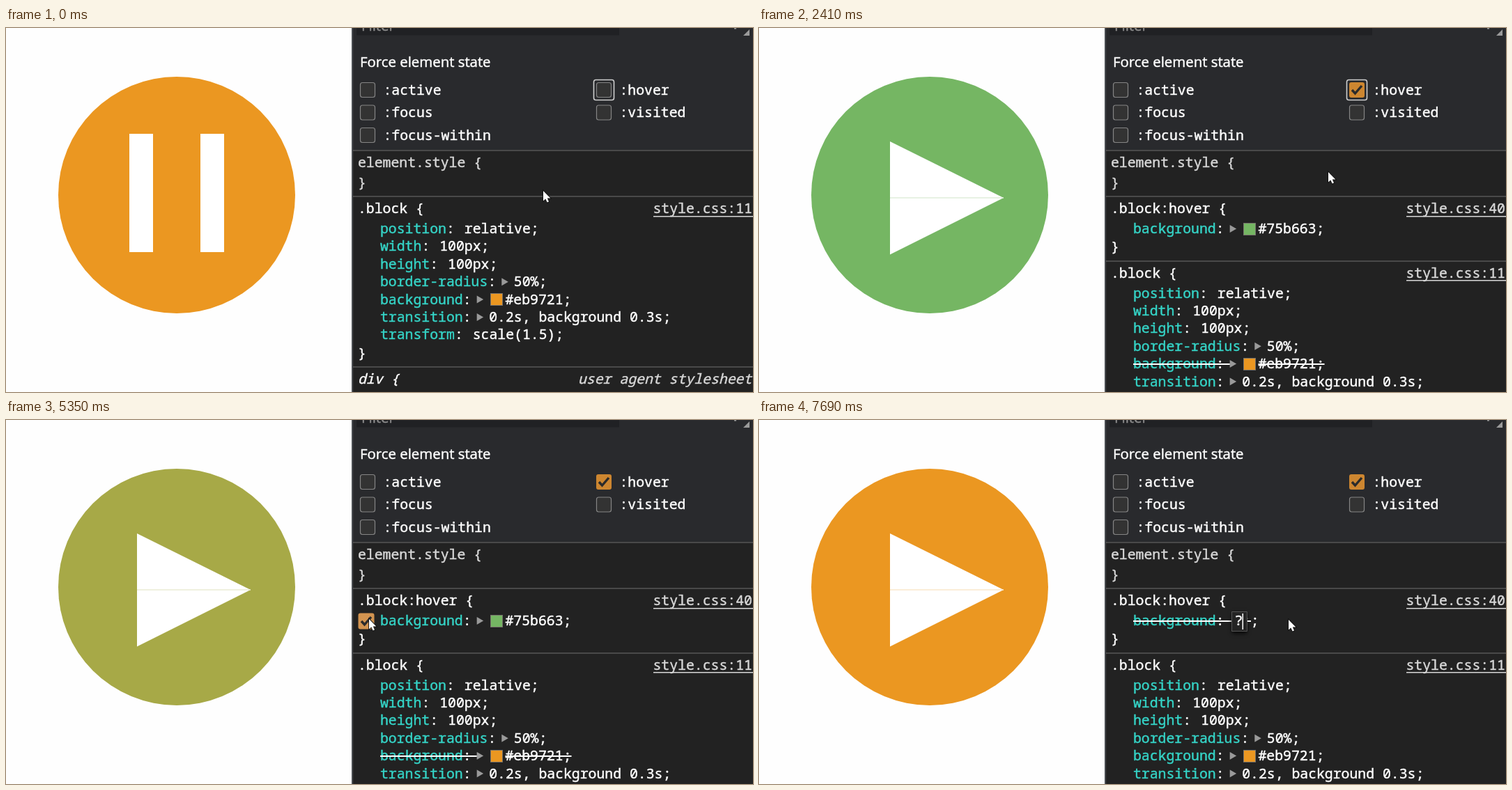
An HTML page with a canvas that plays this animation: 1072x523 px, repeating every 8000 ms.

```html
<!DOCTYPE html>
<html lang="en">
<head>
<meta charset="utf-8">
<title>Forced hover state</title>
<style>
html, body { margin: 0; width: 100%; height: 100%; overflow: hidden; background: #fff; }
canvas { display: block; }
</style>
</head>
<body>
<canvas id="stage" width="1072" height="523"></canvas>
<script>
const ctx = document.getElementById('stage').getContext('2d');
const LOOP = 8000, CHAR = 11.88;
const MONO = '19.8px "Noto Sans Mono", monospace';
const SANS = '20.4px "Open Sans", sans-serif';
const ORANGE = [235, 151, 33], GREEN = [117, 182, 99];
const WHITE = '#fff', GREY = '#d8d8d8', CYAN = '#35d4c7', PANE = '#222222';

const lerp = (a, b, p) => a + (b - a) * p;
const rgb = c => `rgb(${c.map(Math.round)})`;

// CSS "ease": cubic-bezier(.25, .1, .25, 1)
function ease(x) {
  if (x <= 0) return 0;
  if (x >= 1) return 1;
  let lo = 0, hi = 1, u;
  for (let i = 0; i < 20; i++) {
    u = (lo + hi) / 2;
    if (.75 * u * (1 - u) + u ** 3 < x) lo = u; else hi = u;
  }
  return .3 * u * (1 - u) ** 2 + 3 * u * u * (1 - u) + u ** 3;
}

// Background toggles: transition start, repaint times, amount of green reached
const toggles = [
  [1343, [1390, 1460, 1540, 1610], 1],
  [4482, [4500, 4570, 4650, 4820], 0],
  [5250, [5290, 5350, 5440], 1],
  [5906, [5930, 6000, 6080, 6310], 0]
];

function transition([start, repaints], t, duration) {
  if (t < repaints[0]) return 0;
  if (t >= repaints[repaints.length - 1]) return 1;
  const shown = repaints.filter(r => r <= t).pop();
  return ease((shown - start) / duration);
}

function greenAt(t) {
  let green = 0;
  for (const tg of toggles) green = lerp(green, tg[2], transition(tg, t, 300));
  return green;
}

// Pointer moves: from, to, steps, x, y
const moves = [
  [240, 990, 11, 862, 89],
  [2170, 2940, 11, 712, 483],
  [3010, 3800, 11, 592, 331],
  [3890, 4200, 5, 521, 286],
  [6310, 6770, 7, 760, 287]
];

function pointerAt(t) {
  let x = 771, y = 234;
  for (const [from, to, steps, tx, ty] of moves) {
    if (t < from) break;
    const step = Math.min(steps, 1 + Math.floor((t - from) / (to - from) * (steps - 1)));
    const p = step / steps, s = p * p * (3 - 2 * p);
    x = lerp(x, tx, s);
    y = lerp(y, ty, s);
  }
  return [x, y];
}

function rect(x, y, w, h, color) {
  ctx.fillStyle = color;
  ctx.fillRect(x, y, w, h);
}

// A hairline stroke gives the slightly heavier text of a hinted screen font
function text(str, x, y, color = WHITE, font = MONO) {
  const baseline = Math.round(y + 6.5);
  ctx.font = font;
  ctx.fillStyle = ctx.strokeStyle = color;
  ctx.lineWidth = .45;
  ctx.fillText(str, x, baseline);
  ctx.strokeText(str, x, baseline);
}

function polygon(points, color) {
  ctx.beginPath();
  points.forEach(p => ctx.lineTo(...p));
  ctx.closePath();
  ctx.fillStyle = color;
  ctx.fill();
}

function rounded(x, y, w, h, r, fill, stroke, line = 1) {
  ctx.beginPath();
  ctx.roundRect(x, y, w, h, r);
  if (fill) { ctx.fillStyle = fill; ctx.fill(); }
  if (stroke) { ctx.strokeStyle = stroke; ctx.lineWidth = line; ctx.stroke(); }
}

function checkbox(cx, cy, checked, hot, size = 21) {
  const x = cx - size / 2, y = cy - size / 2;
  if (!checked) return rounded(x, y, size, size, 3, hot ? '#3b3b3b' : '#333333', '#858585', 1.2);
  rounded(x - .5, y - .5, size + 1, size + 1, 3, hot ? '#d39450' : '#cd8630');
  ctx.beginPath();
  ctx.moveTo(cx - 7, cy);
  ctx.lineTo(cx - 2.5, cy + 5);
  ctx.lineTo(cx + 7, cy - 6);
  ctx.strokeStyle = '#2b2b2b';
  ctx.lineWidth = 3.4;
  ctx.stroke();
}

function button(t) {
  const green = greenAt(t), turn = transition(toggles[0], t, 200);
  const color = ORANGE.map((c, i) => lerp(c, GREEN[i], green));
  ctx.save();
  ctx.translate(245, 240);
  ctx.beginPath();
  ctx.arc(0, 0, 170, 0, 7);
  ctx.fillStyle = rgb(color);
  ctx.fill();
  ctx.rotate(turn * Math.PI / 2);
  // Each bar folds into one half of the play triangle; the left corner slides out last
  const join = Math.min(1, turn * 1.2), tip = Math.sqrt(turn);
  const top = lerp(-88, -106, turn), bottom = lerp(82, 57, turn);
  for (const [side, corner, spread] of [[-1, -77, turn ** 12], [1, 85.5, turn]]) {
    const inner = lerp(34 * side, 4, join);
    polygon([
      [lerp(68 * side, 4, tip), top], [inner - side * .5 * join, top],
      [inner - side * .5 * join, bottom], [lerp(68 * side, corner, spread), bottom]
    ], WHITE);
  }
  if (turn === 1) rect(3.5, -105, 1, 162, rgb(color.map(c => lerp(255, c, .35))));
  ctx.restore();
}

function divider(y) { rect(498, Math.round(y - 1), 574, 2, '#494949'); }

function link(line, y) {
  text('style.css:' + line, 928.5, y, GREY);
  rect(929, Math.round(y + 10), 143, 1.5, GREY);
}

function strike(from, to, y) { rect(from, Math.round(y - .5), to - from, 2, WHITE); }

function declaration(y, name, value, { arrow, swatch, struck } = {}) {
  text(name, 537, y, CYAN);
  text(':', 537 + name.length * CHAR, y);
  let x = 537 + (name.length + 1) * CHAR;
  const nameEnd = x;
  if (arrow) {
    polygon([[x + 8, y - 5.5], [x + 17.5, y], [x + 8, y + 5.5]], '#9a9a9a');
    x += 25.5;
  } else x += CHAR + 2;
  if (swatch) {
    const sx = Math.round(x + 2), sy = Math.round(y - 9);
    rect(sx, sy, 18, 18, '#77736c');
    rect(sx + 1, sy + 1, 16, 16, swatch);
    x = sx + 21.5;
  }
  text(value, x, y);
  if (struck) {
    strike(537, nameEnd + (arrow ? 8 : 13), y);
    strike(x, x + value.length * CHAR, y);
  }
}

function blockRule(shift, struck, checks) {
  divider(242 + shift);
  text('.block {', 505, 259.5 + shift);
  link(11, 259.5 + shift);
  const rows = [
    ['position', 'relative;'],
    ['width', '100px;'],
    ['height', '100px;'],
    ['border-radius', '50%;', { arrow: true }],
    ['background', '#eb9721;', { arrow: true, swatch: rgb(ORANGE), struck }],
    ['transition', '0.2s, background 0.3s;', { arrow: true }],
    ['transform', 'scale(1.5);']
  ];
  rows.forEach((row, i) => {
    const y = 288.5 + shift + i * 25.4;
    if (checks) checkbox(517, y + .5, true, false, 22);
    declaration(y, ...row);
  });
  text('}', 505, 467 + shift);
  divider(487 + shift);
  text('div {', 505, 504.5 + shift, WHITE, 'italic ' + MONO);
  text('user agent stylesheet', 821, 504.5 + shift, GREY, 'italic ' + MONO);
}

function valueEditor(t) {
  const typed = t >= 7690, value = typed ? '?' : '#75b663';
  const width = value.length * CHAR, y = 288.5;
  text('background', 537, y, CYAN);
  text(':', 537 + 10 * CHAR, y);
  text(';', 693.5 + width - CHAR, y);
  strike(537, 694 + width, y);
  ctx.save();
  ctx.shadowColor = '#000';
  ctx.shadowBlur = 6;
  ctx.shadowOffsetY = 2;
  rounded(678.5, 275.5, width + 10, 28, 0, '#242424');
  ctx.restore();
  rounded(678.5, 275.5, width + 10, 28, 0, null, '#555555');
  text(';', 693.5 + width, y);
  strike(689 + width, 694 + width, y);
  if (!typed) rect(683, 277, width, 25, '#3a5a86');
  text(value, 682.5, y);
  if (typed) rect(693.5, 278, 1.5, 23, WHITE);
}

function hoverRule(t, enabled, showCheck) {
  divider(242);
  text('.block:hover {', 505, 259.5);
  link(40, 259.5);
  if (t >= 6850) valueEditor(t);
  else {
    if (showCheck) checkbox(517, 289, enabled, t >= 4200 && t < 6400, 22);
    declaration(288.5, 'background', '#75b663;', { arrow: enabled, swatch: rgb(GREEN), struck: !enabled });
  }
  text('}', 505, 314.5);
}

function stateOptions(t) {
  rect(498, 0, 574, 175, '#292a2d');
  rect(503, 0, 377, 10.5, '#202124');
  text('Filter', 510, -3, '#8a8a8a', SANS);
  polygon([[1067, 2], [1067, 11], [1058, 11]], '#9a9a9a');
  rect(1045, 0, 3, 1.5, '#9a9a9a');
  text('Force element state', 508, 49, WHITE, SANS);
  const states = [
    [519, 89, ':active'], [519, 121.5, ':focus'], [519, 154, ':focus-within'],
    [858, 89, ':hover'], [858, 121.5, ':visited']
  ];
  for (const [x, y, label] of states) {
    const isHover = label === ':hover';
    checkbox(x, y, isHover && t >= 1230, isHover && t >= 920 && t < 2250);
    text(label, x + 22.5, y);
  }
  if (t < 4420) rounded(843.5, 74.5, 29, 29, 3, null, '#cfcfcf', 1.6);
}

function arrowPointer(x, y) {
  ctx.save();
  ctx.translate(Math.round(x), Math.round(y));
  const shape = new Path2D('M0 0V14.5L3.3 11.4L5.6 16.6L8 15.5L5.8 10.6H10.3Z');
  ctx.strokeStyle = '#111';
  ctx.lineWidth = 1.8;
  ctx.stroke(shape);
  ctx.fillStyle = WHITE;
  ctx.fill(shape);
  ctx.restore();
}

function textPointer() {
  rect(764, 279, 1.5, 15, WHITE);
  rect(761, 279, 7, 1.5, WHITE);
  rect(761, 292.5, 7, 1.5, WHITE);
}

function draw(t) {
  const [px, py] = pointerAt(t);
  rect(0, 0, 1072, 523, '#fefefe');
  button(t);
  rect(496, 0, 576, 523, PANE);
  rect(496, 0, 2, 523, '#494c50');
  stateOptions(t);
  divider(175.5);
  text('element.style {', 505, 193, GREY);
  text('}', 505, 222, GREY);
  if (t < 1390) blockRule(0, false, false);
  else {
    const enabled = t < 4420 || (t >= 5220 && t < 5850);
    hoverRule(t, enabled, py > 242 && py < 331);
    blockRule(92.5, enabled, py >= 331);
  }
  if (t < 6770 || t >= 7690) arrowPointer(px, py);
  else if (t < 7460) textPointer();
}

function tick() {
  draw(performance.now() % LOOP);
  requestAnimationFrame(tick);
}
tick();
</script>
</body>
</html>
```
